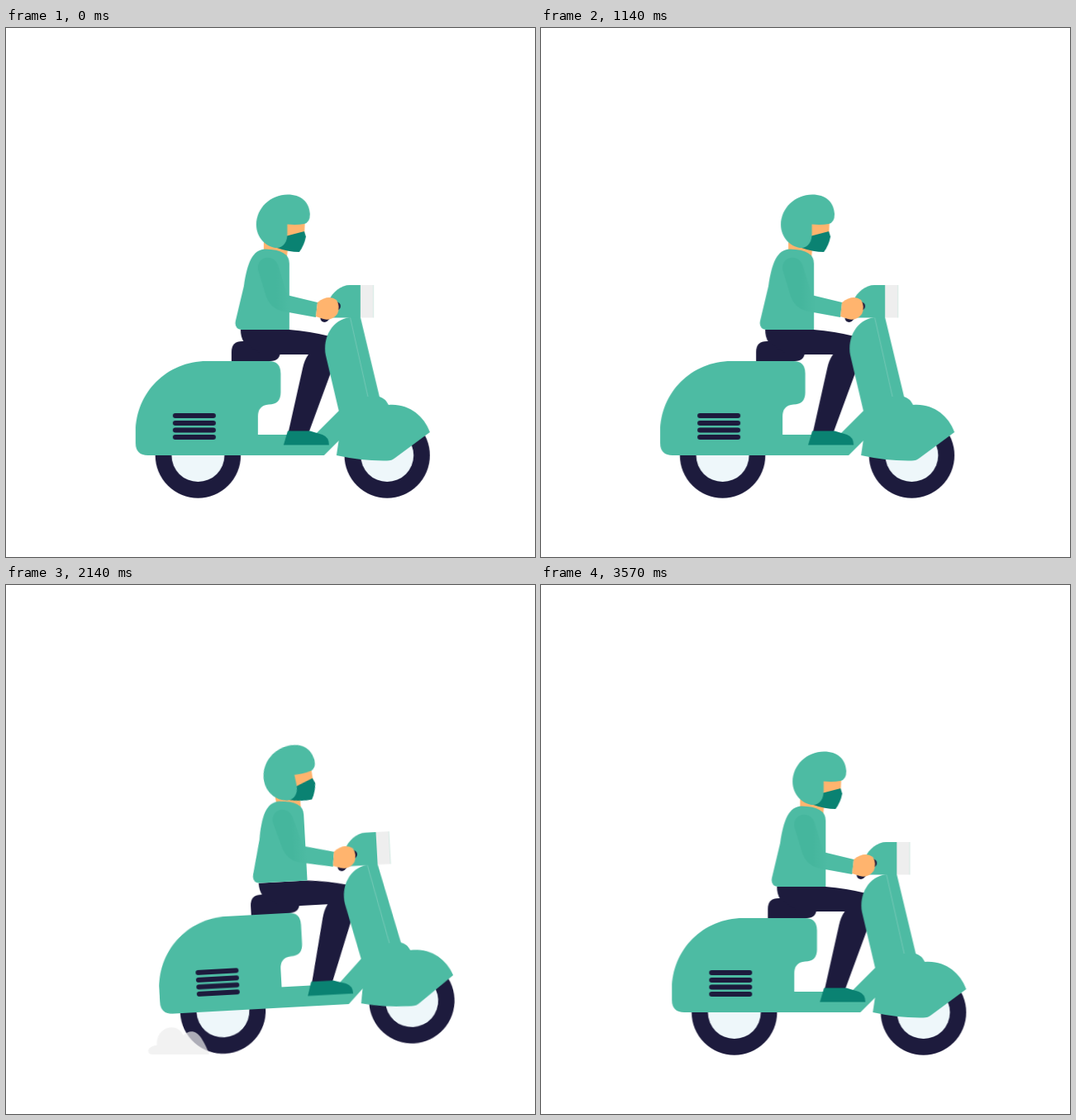
Animation of 640x640 px, one loop 3640 ms. Source, as an HTML page without scripts:

```html
<!DOCTYPE html>
<html lang="en">
<head>
<meta charset="utf-8">
<title>Scooter ride</title>
<style>
  html, body { margin: 0; width: 100%; height: 100%; overflow: hidden; background: #fff; }
  svg { display: block; width: 100%; height: 100%; }

  .teal { fill: #4dbba3; }
  .deep { fill: #0a8272; }
  .navy { fill: #1d1b3d; }
  .skin { fill: #ffb46e; }
  .bar { stroke: #1d1b3d; stroke-linecap: round; fill: none; }

  .ride, .tilt, .head, .smoke { animation: 3640ms linear infinite; }
  .ride { animation-name: ride; }
  .tilt { animation-name: tilt; transform-origin: 201.5px 517px; }
  .head { animation-name: nod; transform-origin: 331px 276px; }
  .smoke { animation-name: puff; transform-origin: 215.7px 568px; }

  /* drift back, surge forward, ease home */
  @keyframes ride {
    0% { transform: translateX(0); }
    11.81% { transform: translateX(-6.2px); }
    15.66% { transform: translateX(-8.1px); }
    23.6% { transform: translateX(-11.2px); }
    31.32% { transform: translateX(-12.8px); }
    34.9% { transform: translateX(-13.3px); animation-timing-function: cubic-bezier(.333, 0, .667, 1); }
    66.76% { transform: translateX(38px); }
    72% { transform: translateX(34.8px); }
    78.57% { transform: translateX(28px); }
    82.42% { transform: translateX(23.8px); }
    94.23% { transform: translateX(7.2px); }
    98.08% { transform: translateX(1.4px); }
    100% { transform: translateX(0); }
  }
  @keyframes tilt {
    0% { transform: rotate(0); }
    34.9% { transform: rotate(0); animation-timing-function: ease-in-out; }
    46.4%, 50.8% { transform: rotate(-5deg); }
    54.9% { transform: rotate(-4.4deg); }
    58.8% { transform: rotate(-3.13deg); }
    62.9% { transform: rotate(-.6deg); }
    65.4%, 100% { transform: rotate(0); }
  }
  @keyframes nod {
    0% { transform: rotate(0); }
    34.9% { transform: rotate(0); animation-timing-function: ease-in-out; }
    46.7%, 49.2% { transform: rotate(-12deg); }
    58.8% { transform: rotate(-9deg); }
    82.42% { transform: rotate(-2.8deg); }
    94.23%, 100% { transform: rotate(0); }
  }
  @keyframes puff {
    0%, 36% { transform: scale(0); opacity: .8; }
    43.13% { transform: scale(1.06); }
    46.98% { transform: scale(1.05); }
    49.18% { transform: scale(1); opacity: .78; }
    58.8% { transform: scale(.945); opacity: .7; }
    62.9% { transform: scale(1.02); opacity: .35; }
    65.4%, 100% { transform: scale(1.02); opacity: 0; }
  }
</style>
</head>
<body>
<svg viewBox="0 0 640 640">
  <defs>
    <g id="wheel">
      <circle class="navy" r="51.7"/>
      <circle r="32" fill="#eef7fa"/>
    </g>
    <linearGradient id="sleeve">
      <stop offset=".3" stop-color="#45b69d"/>
      <stop offset=".55" stop-color="#4dbba3"/>
    </linearGradient>
  </defs>

  <g class="ride">
    <g class="tilt">
      <use href="#wheel" x="232.5" y="517"/>
      <use href="#wheel" x="461.3" y="517"/>

      <!-- rear body and floor -->
      <path class="teal" d="M157 502V489C157 441 195 403 243 403H318Q332.5 403 332.5 418V441Q332.5 455.500 318 455.500Q305 456.500 305 470V492H374L408 458V494L385 517H172Q157 517 157 502Z"/>
      <path class="bar" stroke-width="6" d="M205 469H251M205 478H251M205 486.500H251M205 495H251"/>

      <!-- seat and leg -->
      <path class="navy" d="M273 403V392Q273 379 286 379H332V391Q332 403 320 403Z"/>
      <path class="navy" d="M284 365H343Q368 367 392 373L400 398L392 420L367 488H342L359 412Q361 402 366 395H310L288 380Q284 374 284 365Z"/>
      <path class="deep" d="M336 504.500L341 487.500H368L383 492Q391 495 391 504.500Z"/>

      <!-- steering column and fender -->
      <path class="teal" d="M416 350H429L452 446Q459 448 463 456C487 454 506 469 513 489L471 520Q467 523.500 461 523.500Q431 524 400 517L403 497V464L387 396C383 374 395 353 416 350Z"/>
      <path d="M416.500 350L438 446" fill="none" stroke="#86cfbf" stroke-width=".7"/>

      <!-- headlight -->
      <path class="teal" d="M390 331C395 319 406 311 416 311H429V350.500H392Z"/>
      <path d="M429 311H444.500V350.500H429Z" fill="#eee"/>
      <path d="M444.700 311V350.500" stroke="#b9ddd4" stroke-width=".6"/>

      <!-- rider -->
      <g class="head">
        <path class="skin" d="M312 254H341V268L340 277L312 270ZM336 232H362L361 252L342 264Z"/>
        <path class="deep" d="M328 266L340 251.500L361 246L363 252.500Q361 263 355 271Q342 271 328 266Z"/>
        <path class="teal" d="M340.500 237.500Q352 238.500 361 237Q368 235 368 225C367 210 357 201.500 341 201.500C320 201.500 303 218 303 238C303 253 314 264 326 266C336 267 341 258 340.500 248Z"/>
      </g>
      <path class="teal" d="M343 365H285Q276 364 278 354L288 312C292 285 298 268 314 267.500Q343 268 343 285Z"/>
      <path class="bar" stroke-width="10" d="M385.500 351L400 336.500"/>
      <path fill="url(#sleeve)" d="M305 292C304 274 326 273 330 289L339 319Q340 323 344 324L377 332L375 350L334 342.500Q320 339 315 325Z"/>
      <path class="skin" d="M377 332Q390 322 400 329Q405 337 401 346Q394 355 384 352L375 349Z"/>
    </g>

    <g class="smoke">
      <path transform="translate(-8.3)" fill="#ededed" d="M151 568C144 568 143 558 157 556C156 531 184 526 191 543.500C199 536 207 537 214 547Q221 558 224 568Z"/>
    </g>
  </g>
</svg>
</body>
</html>
```
